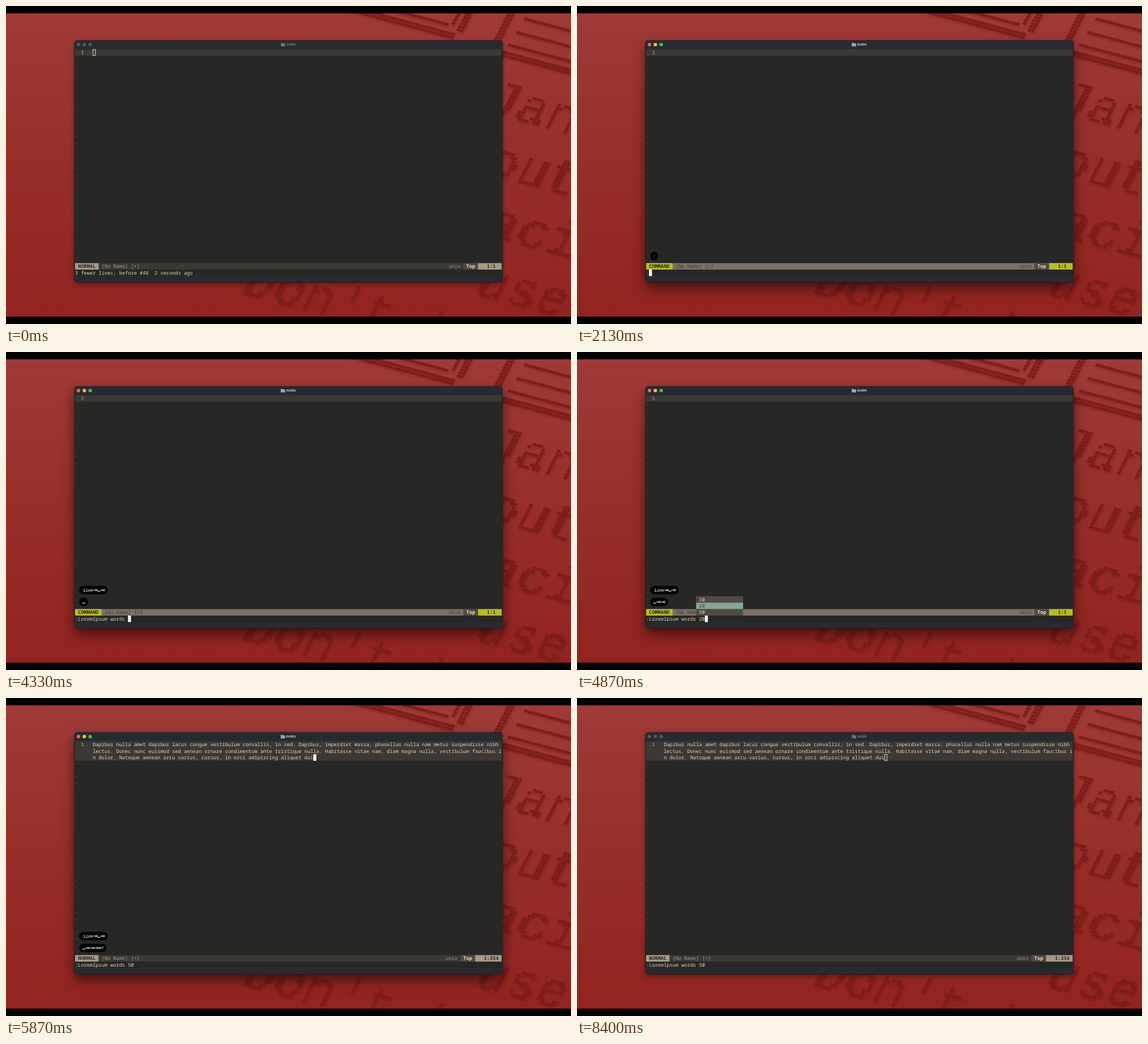
An HTML page with a canvas that plays this animation: 998 px wide and 561 px high, repeating every 8.47 s.

```html
<!DOCTYPE html>
<html lang="en">
<head>
<meta charset="utf-8">
<title>nvim</title>
<style>
html, body { margin: 0; width: 998px; height: 561px; overflow: hidden; background: #000; }
canvas, svg, #win { position: absolute; left: 0; top: 0; }
#win { left: 121px; top: 61px; width: 756px; height: 426px; border-radius: 5px; background: #272b31; }
text { white-space: pre; text-rendering: geometricPrecision; font: 8.66px "Noto Sans Mono", "DejaVu Sans Mono", monospace; }
.title { font: bold 7px Inter, sans-serif; }
.key { font: 8.2px "Liberation Sans", sans-serif; }
</style>
</head>
<body>
<canvas id="wall" width="998" height="561"></canvas>
<div id="win"></div>
<svg id="view" width="998" height="561"></svg>
<script>
const LOOP = 8470, LEFT = 122, TOP = 76.4, CW = 5.196, RH = 11.43, COLS = 145;
const wall = document.getElementById('wall').getContext('2d', { willReadFrequently: true });
const win = document.getElementById('win'), view = document.getElementById('view');
const clamp = v => Math.max(0, Math.min(1, v));

// Wallpaper: slanted brick lettering
function brick(x, y, i, j) {
  wall.setTransform(6.2, 1.65, -2.8, 5.5, x, y);
  wall.fillRect(i, j, 0.9, 0.84);
}
function strip(x, y, nu, nv) {
  for (let j = 0; j < nv; j++) for (let i = 0; i < nu; i++) brick(x, y, i, j);
}
function letters(str, x, y) {
  const w = 90, h = 22, base = 15;
  const c = document.createElement('canvas');
  c.width = w; c.height = h;
  const g = c.getContext('2d');
  g.font = '14px "Liberation Mono", monospace';
  g.fillText(str, 0, base);
  const px = g.getImageData(0, 0, w, h).data;
  for (let j = 0; j < h; j++) for (let i = 0; i < w; i++)
    if (px[(j * w + i) * 4 + 3] > 100) brick(x, y, i, j - base);
}
function paintWall() {
  const sky = wall.createLinearGradient(0, 13, 0, 548);
  sky.addColorStop(0, '#a03a36');
  sky.addColorStop(0.5, '#972e2a');
  sky.addColorStop(1, '#922320');
  wall.fillStyle = sky;
  wall.fillRect(0, 0, 998, 561);
  wall.fillStyle = '#7c1d1a';
  wall.shadowColor = 'rgba(70,0,0,.25)';
  wall.shadowBlur = 4;
  wall.shadowOffsetX = 1;
  wall.shadowOffsetY = 3;
  strip(590, -6, 33, 2);
  strip(820, -5, 2, 9);
  strip(690, 6, 15, 1);
  strip(803, 0, 1, 6);
  strip(888, 8, 2, 12);
  strip(917, 20, 14, 1);
  strip(903, 44, 17, 1);
  strip(888, 66, 19, 1);
  strip(854, 72, 25, 2);
  letters('Jan', 841, 186);
  letters('out', 841, 295);
  letters('acin', 841, 404);
  letters('use', 823, 508);
  letters("Don't t", 411, 506);
  wall.setTransform(1, 0, 0, 1, 0, 0);
  wall.shadowColor = 'transparent';
  wall.fillStyle = '#000';
  wall.fillRect(0, 0, 998, 13);
  wall.fillRect(0, 548, 998, 13);
}

// Terminal grid helpers
const X = col => LEFT + col * CW, Y = row => TOP + row * RH;
const rect = (x, y, w, h, fill, more = '') =>
  `<rect x="${x}" y="${y}" width="${w}" height="${h}" fill="${fill}" ${more}/>`;
const cells = (col, row, n, fill, rows = 1) => rect(X(col), Y(row), n * CW, rows * RH, fill);
const label = (col, row, str, fill, more = '') =>
  `<text x="${X(col)}" y="${Y(row) + 8.8}" fill="${fill}" ${more}>${str}</text>`;
const bold = 'font-weight="600" style="font-weight:600"';

const LOREM = [
  'Dapibus nulla amet dapibus lacus congue vestibulum convallis, in sed. Dapibus, imperdiet massa, phasellus nulla nam metus suspendisse nibh',
  'lectus. Donec nunc euismod sed aenean ornare condimentum ante tristique nulla. Habitasse vitae nam, diam magna nulla, vestibulum faucibus i',
  'n dolor. Natoque aenean arcu varius, cursus, in orci adipiscing aliquet dui.'
];
const CMD = ':LoremIpsum';
// time, command line, key shown (t = tab, s = space, n = enter)
const STEPS = [
  [1930, ':', ':'], [2270, ':L', 'L'], [2400, ':Lo', 'o'], [2530, ':Lor', 'r'], [2670, ':Lore', 'e'],
  [2870, CMD, 't'], [3330, CMD + ' ', 's'], [3530, CMD + ' words', 't'], [3930, CMD + ' words ', 's'],
  [4470, CMD + ' words 10', 't'], [4730, CMD + ' words 20', 't'], [4930, CMD + ' words 50', 't'],
  [5270, CMD + ' words 50', 'n']
];
const SPLIT = 3930, ENTER = 5270, DONE = 5330;
const ICONS = {
  t: [8.1, 'M0 0h6M4-2l2 2-2 2M7.2-2.2v4.4'],
  s: [4.8, 'M.4 .5v1.8h3.8v-1.8'],
  n: [8.1, 'M7-2.5v2.5h-6.5m2-2-2 2 2 2']
};

function bubble(keys, y, alpha) {
  if (!keys || alpha <= 0) return '';
  let x = 135, marks = '';
  wall.font = '8.2px "Liberation Sans", sans-serif';
  for (const k of keys) {
    const icon = ICONS[k];
    marks += icon
      ? `<path d="${icon[1]}" transform="translate(${x} ${y})" fill="none" stroke="#fff" stroke-width=".9"/>`
      : `<text class="key" x="${x}" y="${y + 2.9}" fill="#fff">${k}</text>`;
    x += icon ? icon[0] : wall.measureText(k).width;
  }
  return `<g opacity="${alpha}">` +
    rect(129.2, y - 7.4, Math.max(14.6, x - 124), 14.8, '#050505', 'rx="7.4"') + marks + '</g>';
}

function menu(col, items, chosen) {
  return items.map((item, i) => {
    const row = 34 - items.length + i, on = i === chosen;
    return cells(col, row, 16, on ? '#83a598' : '#504945') +
      label(col + 1, row, item, on ? '#504945' : '#ebdbb2');
  }).join('');
}

function titleBar(f) {
  let s = '';
  ['#ff5f57', '#febc2e', '#38c149'].forEach((c, i) => {
    const dot = (fill, o) => `<circle cx="${128 + i * 10.35}" cy="68" r="3.1" fill="${fill}" opacity="${o}"/>`;
    s += dot('#53585d', 1) + dot(c, f);
  });
  const name = (icon, ink, o) => `<g opacity="${o}">` +
    `<path d="M485.5 65h3l1 1h3.5v5.2h-7.5z" fill="${icon}"/>` +
    `<text class="title" x="495" y="70.4" fill="${ink}">nvim</text></g>`;
  return s + name('#6c7073', '#777b7e', 1) + name('#91a9b4', '#b4b7ba', f);
}

function statusLine(command, pos) {
  const mode = command ? ' COMMAND ' : ' NORMAL ', accent = command ? '#b8bb26' : '#a89984';
  const ink = command ? '#433d39' : '#a89984', edge = COLS - 5 - pos.length + (pos.length < 5 ? 0 : 1);
  const start = pos.length < 5 ? 137 : 136;
  return cells(0, 33, COLS, command ? '#7c6f64' : '#3c3836') +
    cells(0, 33, mode.length, accent) + label(0, 33, mode, '#282828', bold) +
    label(mode.length + 1, 33, '[No Name] [+]', ink) +
    label(start - 10, 33, 'unix', ink) +
    cells(start - 5, 33, 5, '#504945') + label(start - 4, 33, 'Top', '#ebdbb2', bold) +
    cells(start, 33, COLS - start, accent) + label(start + 3, 33, pos, '#282828', bold);
}

function cursor(col, row, solid) {
  return solid ? cells(col, row, 1, '#fff')
    : rect(X(col) + .4, Y(row) + .4, CW - .8, RH - .8, 'none', 'stroke="#e8e8e8" stroke-width=".9"');
}

function scene(t, f) {
  const filled = t >= ENTER, command = t >= STEPS[0][0] && t < DONE, focused = f > .5;
  const past = STEPS.filter(s => s[0] <= t);
  const line = past.length ? past[past.length - 1][1] : '3 fewer lines; before #48  2 seconds ago';
  const used = filled ? 3 : 1;
  let s = titleBar(f) + cells(0, 0, COLS, '#272726', 35) + cells(0, 0, COLS, '#3c3836', used) +
    label(2, 0, '1', '#eeb74a');
  for (let r = used; r < 33; r++) s += label(0, r, '~', '#504945');
  if (filled) {
    LOREM.forEach((str, r) => s += label(6, r, str, '#e3d5ae'));
    s += cursor(75 + 6, 2, focused);
    if (focused) s += label(81, 2, '.', '#282828');
  } else if (!command) s += cursor(6, 0, focused);

  s += statusLine(command, filled && !command ? '1:354' : '1:1') + label(0, 34, line, '#e3d5ae');
  if (command && !filled) s += cursor(line.length, 34, true);
  if (t >= 3530 && t < SPLIT) s += menu(11, ['words', 'paragraphs'], 0);
  if (t >= 4470 && t < ENTER) s += menu(17, ['10', '20', '50'], past.length - 10);

  const keys = late => past.filter(p => (p[0] >= SPLIT) === late).map(p => p[2]).join('');
  const rise = 1 - (1 - clamp((t - SPLIT) / 200)) ** 2;
  return s + bubble(keys(false), 441 - 21 * rise, clamp((6030 - t) / 160)) +
    bubble(keys(true), 441, clamp((7465 - t) / 150));
}

let shown = '';
function frame(now) {
  const t = now % LOOP;
  const f = t < 4000 ? clamp((t - 1060) / 200) : clamp((8395 - t) / 130);
  const next = scene(t, f);
  if (next !== shown) view.innerHTML = shown = next;
  win.style.boxShadow = `0 0 0 .7px rgba(20,20,22,.8), 0 ${4 + 6 * f}px ${10 + 12 * f}px rgba(0,0,0,${.35 + .2 * f})`;
  requestAnimationFrame(frame);
}
paintWall();
requestAnimationFrame(frame);
</script>
</body>
</html>
```
